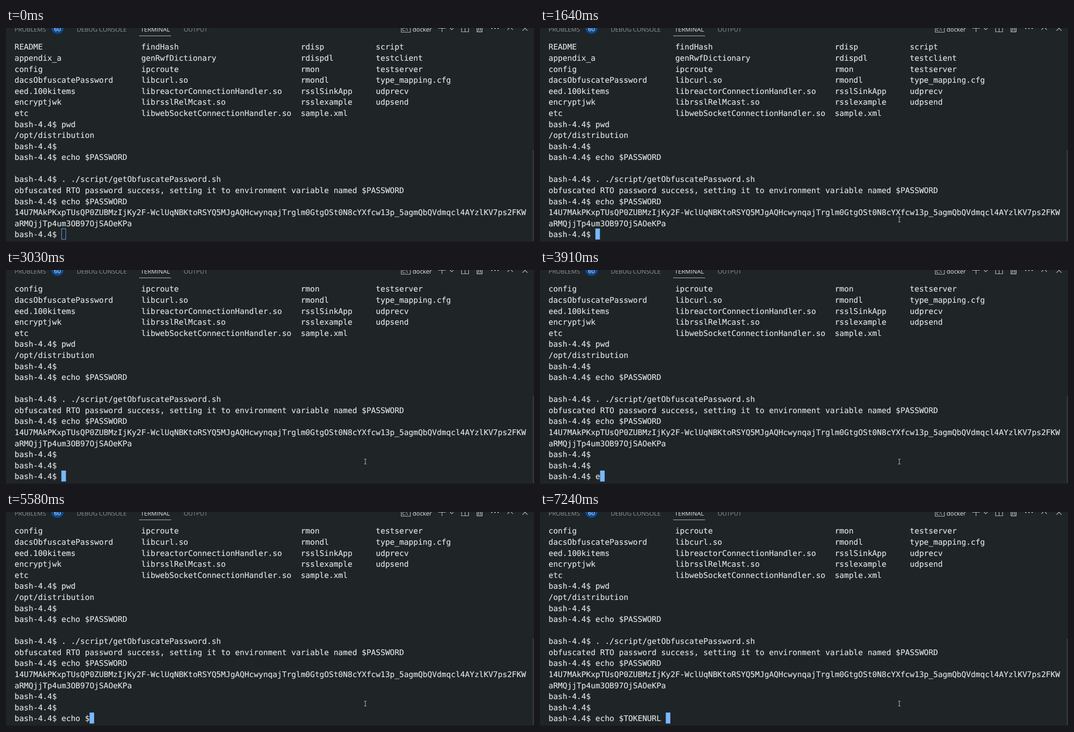
An HTML page that plays this animation: 1174x477 px, repeating every 8000 ms.

```html
<!DOCTYPE html>
<html lang="en">
<head>
<meta charset="utf-8">
<title>Terminal</title>
<style>
  html, body { margin: 0; width: 100%; height: 100%; overflow: hidden; background: #1f2427; }
  svg { display: block; }
  text { white-space: pre; text-rendering: geometricPrecision; font-variant-ligatures: none; }
  #rows { font: 17.33px "DejaVu Sans Mono", monospace; fill: #e0e3e4; stroke: #e0e3e4; stroke-width: .2; }
  #bar { font: 13.5px "Open Sans", "Noto Sans", sans-serif; fill: #8d9294; }
  #bar .on { fill: #e4e6e7; }
  #icons { fill: none; stroke: #c5c9ca; stroke-width: 1.2; }
</style>
</head>
<body>
<svg width="1174" height="477">
  <g id="bar">
    <text x="19" y="7.5">PROBLEMS</text>
    <circle cx="114.5" cy="-1" r="14" fill="#0b4a92"/>
    <text x="107" y="7" fill="#f2f5f8" font-size="13">60</text>
    <text x="157.500" y="7.5">DEBUG CONSOLE</text>
    <text x="299.500" y="7.5" class="on">TERMINAL</text>
    <rect x="296" y="17" width="71" height="1" fill="#c9cdcf"/>
    <text x="395" y="7.5">OUTPUT</text>
    <text x="881" y="6.5" class="on" font-size="10">C:\</text>
    <text x="904" y="7.5" class="on">docker</text>
  </g>
  <g id="icons">
    <path d="M879 -6V9.500H899V-6"/>
    <path d="M961 .5H978M969.500 -8V9"/>
    <path d="M987 0L991 4L995 0"/>
    <path d="M1013 -6V8.500H1028.500V-6M1020.700 -6V8.500"/>
    <path d="M1047.500 -6V8.500H1058.500V-6M1051 -5V6M1055 -5V6" stroke-width="1.500"/>
    <path d="M1079 1H1081.500M1086 1H1088.500M1093 1H1095.500" stroke-width="2.200"/>
    <path d="M1115 4L1121 -2L1127 4"/>
    <path d="M1148.500 -5L1159.500 6M1159.500 -5L1148.500 6"/>
  </g>
  <rect id="thumb" x="1171" width="3" fill="#323839"/>
  <rect y="476" width="1174" height="1" fill="#171b1d"/>
  <g id="rows"></g>
  <rect id="caret" y="447.500" width="9.200" height="23.500" stroke="#6fb3f8"/>
  <path id="pointer" d="M-2.500 -5.500H-.8L0 -5L.8 -5.500H2.500M0 -5V5M-2.500 5.500H-.8L0 5L.8 5.500H2.500" fill="none" stroke="#d0d4d5"/>
</svg>
<script>
const LOOP = 8000, LEFT = 19, CELL = 10.433, ROW = 24.59, BASELINE = 48.4, ROWS = 18;
const PROMPT = 'bash-4.4$ ';
const COLUMN_WIDTHS = [27, 34, 16, 0];
const listing = [
  'README findHash rdisp script',
  'appendix_a genRwfDictionary rdispdl testclient',
  'config ipcroute rmon testserver',
  'dacsObfuscatePassword libcurl.so rmondl type_mapping.cfg',
  'eed.100kitems libreactorConnectionHandler.so rsslSinkApp udprecv',
  'encryptjwk librsslRelMcast.so rsslexample udpsend',
  'etc libwebSocketConnectionHandler.so sample.xml'
].map(line => line.split(' ').map((name, i) => name.padEnd(COLUMN_WIDTHS[i])).join(''));

const history = [
  ...listing,
  PROMPT + 'pwd',
  '/opt/distribution',
  PROMPT,
  PROMPT + 'echo $PASSWORD',
  '',
  PROMPT + '. ./script/getObfuscatePassword.sh',
  'obfuscated RTO password success, setting it to environment variable named $PASSWORD',
  PROMPT + 'echo $PASSWORD',
  '14U7MAkPKxpTUsQP0ZUBMzIjKy2F-WclUqNBKtoRSYQ5MJgAQHcwynqajTrglm0GtgOSt0N8cYXfcw13p_5agmQbQVdmqcl4AYzlKV7ps2FKW',
  'aRMQjjTp4um3OB97OjSAOeKPa'
];

const COMMAND = 'echo $TOKENURL ';
const KEY_TIMES = [3910, 4310, 4440, 4710, 4980, 5580, 5910, 6180, 6450, 6710];
const COMPLETION = 7240;
const ENTER_TIMES = [2230, 3030];
const FOCUS = 1570, SETTLE = 1640;
const MOVE = { start: 820, end: 1300, steps: 7, from: [932, 474], to: [800, 427] };

const byId = id => document.getElementById(id);
const rows = byId('rows'), caret = byId('caret'), pointer = byId('pointer'), thumb = byId('thumb');
const countPast = (times, t) => times.filter(time => t >= time).length;

const rowTexts = Array.from({ length: ROWS }, (_, i) => {
  const text = document.createElementNS('http://www.w3.org/2000/svg', 'text');
  text.setAttribute('x', LEFT);
  text.setAttribute('y', BASELINE + i * ROW);
  return rows.appendChild(text);
});

function setAttrs(node, attrs) {
  for (const [name, value] of Object.entries(attrs)) node.setAttribute(name, value);
}

function pointerAt(t) {
  if (t >= SETTLE) return [799, 427];
  if (t >= FOCUS) return [803, 423.5];
  const { start, end, steps, from, to } = MOVE;
  const u = Math.min(1, Math.floor((t - start) / (end - start) * steps) / steps);
  const eased = 1 - (1 - u) ** 2;
  return from.map((v, i) => v + (to[i] - v) * eased);
}

function draw(t) {
  const enters = countPast(ENTER_TIMES, t);
  const keys = countPast(KEY_TIMES, t);
  // Tab completion finishes the variable name.
  const typed = t >= COMPLETION ? COMMAND : COMMAND.slice(0, keys);
  const lines = [...history, ...Array(enters).fill(PROMPT), PROMPT + typed].slice(-ROWS);
  rowTexts.forEach((node, i) => {
    if (node.textContent !== lines[i]) node.textContent = lines[i];
  });

  setAttrs(caret, {
    x: LEFT + (PROMPT.length + typed.length) * CELL + 0.3,
    fill: t >= FOCUS ? '#79b8ff' : 'none'
  });
  const top = 272 + enters * 5;
  setAttrs(thumb, { y: top, height: 475 - top });

  const visible = t >= MOVE.start;
  pointer.style.display = visible ? '' : 'none';
  if (visible) pointer.setAttribute('transform', `translate(${pointerAt(t)})`);
}

const origin = performance.now();
function tick() {
  draw((performance.now() - origin) % LOOP);
  requestAnimationFrame(tick);
}
draw(0);
requestAnimationFrame(tick);
</script>
</body>
</html>
```
